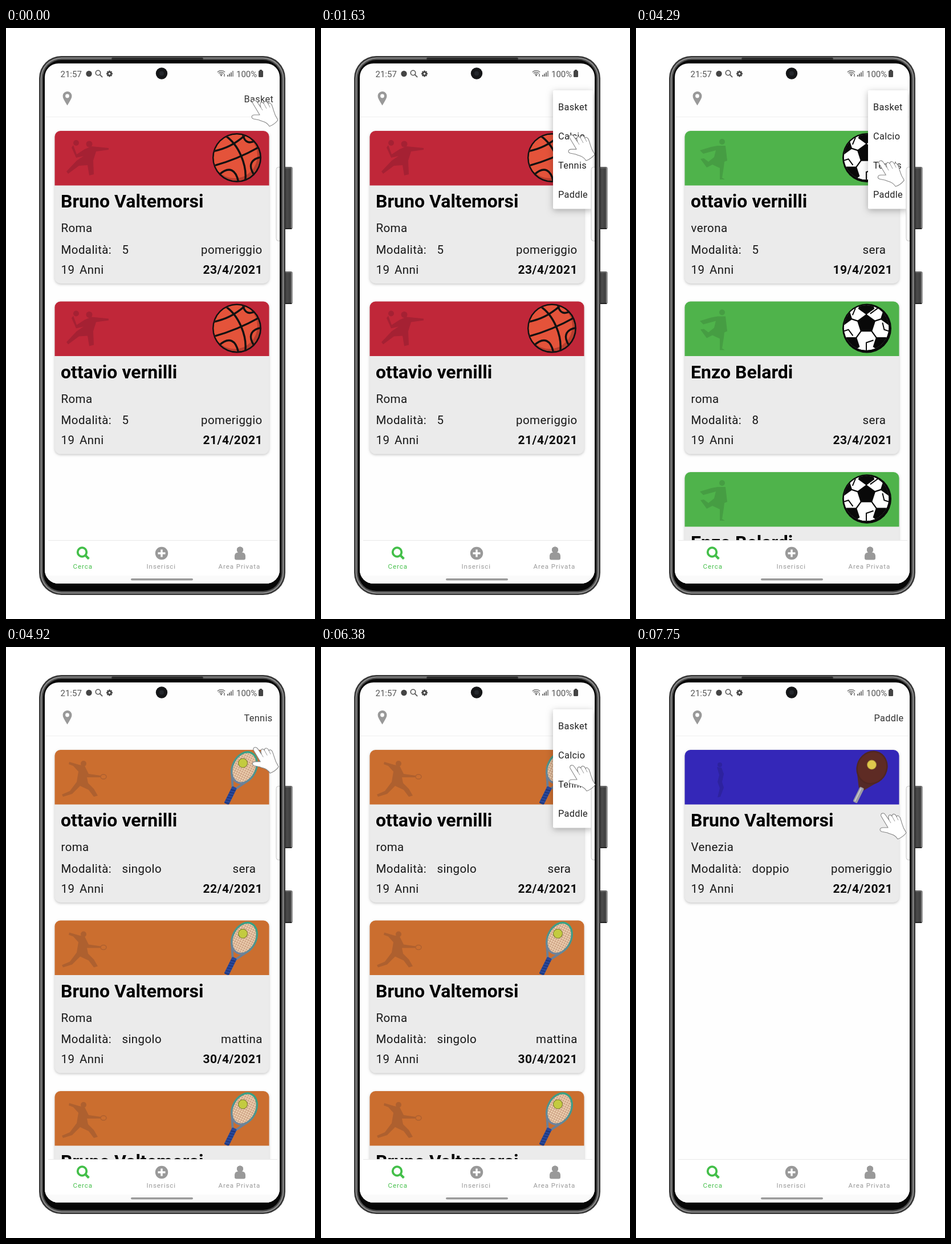
Recreate the animation shown at these times as an HTML page with a canvas. Size 542 by 1034 pixels, loop 7870 ms.

```html
<!DOCTYPE html>
<html lang="it">
<head>
<meta charset="utf-8">
<title>Cerca</title>
<style>
html, body { margin: 0; width: 100%; height: 100%; overflow: hidden; background: #fff; }
canvas { display: block; width: 542px; height: 1034px; }
</style>
</head>
<body>
<canvas id="stage" width="542" height="1034"></canvas>
<script>
const ctx = document.getElementById('stage').getContext('2d');
const LOOP = 7870;
const TAU = Math.PI * 2;
const BRUNO = 'Bruno Valtemorsi', OTTAVIO = 'ottavio vernilli', ENZO = 'Enzo Belardi';

// Card rows: name, city, mode, part of day, its x, date
const sports = {
  Basket: { color: '#c02739', shade: '#a52133', art: basketball, player: thrower, cards: [
    [BRUNO, 'Roma', '5', 'pomeriggio', 342, '23/4/2021'],
    [OTTAVIO, 'Roma', '5', 'pomeriggio', 342, '21/4/2021']] },
  Calcio: { color: '#4fb34b', shade: '#469d43', art: football, player: kicker, cards: [
    [OTTAVIO, 'verona', '5', 'sera', 397.5, '19/4/2021'],
    [ENZO, 'roma', '8', 'sera', 397.5, '23/4/2021'],
    [ENZO, 'roma', '8', 'sera', 397.5, '23/4/2021']] },
  Tennis: { color: '#cb6e2f', shade: '#ae602f', art: racket, player: tennisPlayer, cards: [
    [OTTAVIO, 'roma', 'singolo', 'sera', 397.5, '22/4/2021'],
    [BRUNO, 'Roma', 'singolo', 'mattina', 377, '30/4/2021'],
    [BRUNO, 'Roma', 'singolo', 'mattina', 377, '30/4/2021']] },
  Paddle: { color: '#3427b8', shade: '#2d229f', art: paddle, player: padelPlayer, cards: [
    [BRUNO, 'Venezia', 'doppio', 'pomeriggio', 342, '22/4/2021']] }
};

// Time, fingertip x, fingertip y
const handPath = [
  [0, 433, 128], [1080, 433, 129], [1560, 436, 188], [1980, 436, 189],
  [2600, 436, 138], [3450, 434, 131], [4180, 426, 233], [4480, 427, 234],
  [5300, 440, 131], [5580, 432, 129], [5960, 433, 131], [6380, 437, 208],
  [6960, 431, 290], [7750, 430, 292], [LOOP, 430, 292]
];
const menuTimes = [[1000, 1880], [3400, 4440], [5860, 7200]];

function sportAt(t) {
  return t < 1900 ? 'Basket' : t < 4460 ? 'Calcio' : t < 7220 ? 'Tennis' : 'Paddle';
}

function menuAlpha(t) {
  const clamp = v => Math.max(0, Math.min(1, v));
  return Math.max(...menuTimes.map(([a, b]) => Math.min(clamp((t - a) / 120), clamp((b + 80 - t) / 80))));
}

function handAt(t) {
  const i = Math.max(1, handPath.findIndex(k => k[0] >= t));
  const [t0, x0, y0] = handPath[i - 1], [t1, x1, y1] = handPath[i];
  const u = (t - t0) / (t1 - t0), e = u * u * (3 - 2 * u);
  return [x0 + (x1 - x0) * e, y0 + (y1 - y0) * e];
}

function box(x, y, w, h, r, color) {
  ctx.beginPath();
  ctx.roundRect(x, y, w, h, r);
  if (color) { ctx.fillStyle = color; ctx.fill(); }
}

function disc(x, y, r, color) {
  ctx.beginPath();
  ctx.arc(x, y, r, 0, TAU);
  ctx.fillStyle = color;
  ctx.fill();
}

function line(color, width, ...pts) {
  ctx.beginPath();
  for (let i = 0; i < pts.length; i += 2) ctx.lineTo(pts[i], pts[i + 1]);
  ctx.strokeStyle = color;
  ctx.lineWidth = width;
  ctx.stroke();
}

function poly(color, ...pts) {
  ctx.beginPath();
  for (let i = 0; i < pts.length; i += 2) ctx.lineTo(pts[i], pts[i + 1]);
  ctx.closePath();
  ctx.fillStyle = color;
  ctx.fill();
}

function text(str, x, y, size, color = '#181818', spacing = 0, weight = 400) {
  ctx.font = `${weight} ${size}px Roboto, sans-serif`;
  ctx.letterSpacing = spacing + 'px';
  ctx.fillStyle = color;
  ctx.fillText(str, x, y);
}

function shadowed(color, blur, dy, draw) {
  ctx.save();
  ctx.shadowColor = color;
  ctx.shadowBlur = blur;
  ctx.shadowOffsetY = dy;
  draw();
  ctx.restore();
}

function thrower(c) {
  disc(123, 201, 5, c);
  disc(146, 203, 5.5, c);
  poly(c, 118, 205, 124, 221, 138, 212, 150, 207, 180, 210, 180, 213, 158, 216, 153, 232, 154, 256,
    146, 258, 143, 240, 128, 241, 109, 255, 106, 251, 124, 232, 136, 224, 123, 227, 115, 209);
}

function kicker(c) {
  disc(151, 199, 5, c);
  poly(c, 143, 206, 157, 206, 160, 232, 155, 234, 154, 243, 151, 262, 156, 265, 147, 265, 147, 245,
    134, 239, 124, 244, 113, 229, 119, 228, 127, 234, 137, 226, 140, 214, 118, 220, 112, 214, 132, 208);
}

function tennisPlayer(c) {
  disc(136, 204, 5, c);
  poly(c, 128, 206, 138, 208, 145, 222, 166, 225, 165, 228, 142, 228, 144, 238, 154, 248, 161, 260,
    154, 262, 145, 250, 130, 243, 116, 257, 100, 262, 98, 258, 112, 252, 124, 236, 127, 218, 118, 208, 110, 205, 111, 201);
  ctx.beginPath();
  ctx.ellipse(171, 227, 5, 4, 0, 0, TAU);
  ctx.strokeStyle = c;
  ctx.lineWidth = 1.5;
  ctx.stroke();
}

function padelPlayer(c) {
  disc(147, 206, 4, c);
  poly(c, 142, 210, 150, 211, 154, 222, 151, 236, 154, 246, 148, 262, 143, 263, 147, 247, 143, 236, 146, 224);
}

function basketball() {
  ctx.save();
  ctx.translate(405, 227);
  disc(0, 0, 43, '#111');
  ctx.beginPath();
  ctx.arc(0, 0, 40.5, 0, TAU);
  ctx.clip();
  ctx.fillStyle = '#b93d2e';
  ctx.fill();
  disc(-4, -4, 40, '#e4533a');
  ctx.rotate(-0.38);
  ctx.strokeStyle = '#111';
  ctx.lineWidth = 3.4;
  ctx.beginPath();
  ctx.moveTo(-44, -2);
  ctx.quadraticCurveTo(0, 3, 44, -3);
  ctx.moveTo(-5, -44);
  ctx.bezierCurveTo(12, -20, 12, 20, -2, 44);
  ctx.moveTo(-36, -26);
  ctx.bezierCurveTo(-14, -22, 4, -22, 36, -34);
  ctx.moveTo(-40, 16);
  ctx.bezierCurveTo(-18, 8, -8, 18, -14, 44);
  ctx.moveTo(18, 44);
  ctx.bezierCurveTo(10, 16, 26, 10, 44, 16);
  ctx.moveTo(26, -40);
  ctx.bezierCurveTo(20, -18, 30, -14, 44, -16);
  ctx.stroke();
  ctx.restore();
}

function football() {
  const at = (r, a, x = 0, y = 0) => [x + r * Math.cos(a), y + r * Math.sin(a)];
  const pentagon = (x, y, r, turn) =>
    poly('#090909', ...[0, 1, 2, 3, 4].flatMap(i => at(r, turn + i * TAU / 5, x, y)));
  ctx.save();
  ctx.translate(405, 227);
  disc(0, 0, 43, '#090909');
  ctx.beginPath();
  ctx.arc(-1, -1, 39.5, 0, TAU);
  ctx.clip();
  ctx.fillStyle = '#fff';
  ctx.fill();
  ctx.translate(-1, -8);
  pentagon(0, 0, 17, -TAU / 4);
  for (let i = 0; i < 5; i++) {
    const a = -TAU / 4 + i * TAU / 5, far = [31, 41, 44, 44, 41][i];
    const p = at(far, a);
    line('#090909', 2.2, ...at(15, a), ...p);
    pentagon(...p, 15, a + Math.PI);
    const b = a + TAU / 10;
    line('#090909', 2, ...at(15, a + TAU / 4 + 1.1, ...p), ...at(33, b), ...at(60, b));
  }
  ctx.restore();
}

function racketHead(rx, ry, fill) {
  ctx.beginPath();
  ctx.ellipse(0, 0, rx, ry, 0, 0, TAU);
  ctx.fillStyle = fill;
  ctx.fill();
}

function racket() {
  ctx.save();
  ctx.translate(418, 211);
  ctx.rotate(0.46);
  line('#6d7f94', 4, -16, 17, -3, 40);
  line('#6d7f94', 4, 16, 17, 3, 40);
  box(-4.5, 38, 9, 33, 2, '#29489a');
  for (let y = 43; y < 70; y += 5) line('#182d6c', 1.2, -4, y + 2, 4, y);
  racketHead(20, 28, '#edd0b0');
  ctx.save();
  ctx.clip();
  for (let i = -28; i <= 28; i += 4) {
    line('#c6987c', 0.9, i, -30, i, 30);
    line('#c6987c', 0.9, -22, i, 22, i);
  }
  ctx.restore();
  const rim = ctx.createLinearGradient(0, -28, 0, 28);
  rim.addColorStop(0, '#38a184');
  rim.addColorStop(0.55, '#4f938f');
  rim.addColorStop(1, '#70829b');
  ctx.beginPath();
  ctx.ellipse(0, 0, 20.5, 28.5, 0, 0, TAU);
  ctx.strokeStyle = rim;
  ctx.lineWidth = 3.4;
  ctx.stroke();
  ctx.restore();
  disc(415.5, 203, 8.5, '#76732d');
  disc(415.5, 203, 7.5, '#c3cb3f');
}

function paddle() {
  ctx.save();
  ctx.translate(414, 211);
  ctx.rotate(0.46);
  poly('#542a27', -22, 16, 22, 16, 5, 42, -5, 42);
  box(-4, 39, 8, 29, 2, '#9b9ba3');
  line('#c9c9cd', 2, -1, 41, -1, 66);
  racketHead(27, 30, '#502622');
  racketHead(24.5, 27.5, '#5e2b24');
  ctx.restore();
  disc(413.5, 206, 8.5, '#a88c38');
  disc(413.5, 206, 7.5, '#dfc84c');
}

function card(sport, [name, city, mode, part, partX, date], dy) {
  ctx.save();
  ctx.translate(0, dy);
  shadowed('rgba(0,0,0,.22)', 4, 1.5, () => box(85.5, 180, 376, 267, 10, '#ebebeb'));
  box(85.5, 180, 376, 95.5, [10, 10, 0, 0], sport.color);
  ctx.save();
  ctx.clip();
  sport.player(sport.shade);
  sport.art();
  ctx.restore();
  text(name, 96, 314, 32, '#000', 0, 700);
  text(city, 96.5, 357, 20.5, '#181818', 0.4);
  text('Modalità:', 96.5, 394.5, 20.5, '#181818', 0.4);
  text(mode, 203.5, 394.5, 20.5, '#181818', 0.4);
  text(part, partX, 394.5, 20.5, '#181818', 0.4);
  text('19', 96.5, 429.5, 20.5, '#181818', 0.4);
  text('Anni', 129, 429.5, 20.5, '#181818', 0.4);
  text(date, 345.5, 429.5, 21, '#0a0a0a', 0.5, 700);
  ctx.restore();
}

function gear(x, y, r, color) {
  ctx.save();
  ctx.translate(x, y);
  for (let i = 0; i < 4; i++) {
    line(color, 2.6, -r, 0, r, 0);
    ctx.rotate(TAU / 8);
  }
  disc(0, 0, r * 0.75, color);
  disc(0, 0, r * 0.32, '#fff');
  ctx.restore();
}

function lens(x, y, r, width, tail, color) {
  ctx.beginPath();
  ctx.arc(x, y, r, 0, TAU);
  ctx.strokeStyle = color;
  ctx.lineWidth = width;
  ctx.stroke();
  const d = r * 0.75;
  line(color, width * 1.1, x + d, y + d, x + d + tail, y + d + tail);
}

function statusBar() {
  const c = '#555';
  text('21:57', 95.5, 85.5, 15, c, 0);
  disc(145.5, 80, 5.2, '#444');
  lens(161.5, 78.5, 4.2, 1.6, 4.5, c);
  gear(181.5, 80, 5.5, '#444');
  disc(273, 79.5, 10.2, '#151618');
  disc(273, 79.5, 4, '#24272c');
  ctx.lineWidth = 1.5;
  ctx.strokeStyle = '#777';
  for (const r of [3.5, 6.5, 9.5]) {
    ctx.beginPath();
    ctx.arc(377.5, 84, r, -2.35, -0.8);
    ctx.stroke();
  }
  disc(377.5, 83, 1.3, c);
  line(c, 1.2, 383, 80, 383, 85);
  for (let i = 0; i < 4; i++) line(i < 3 ? '#666' : '#888', 1.8, 389 + i * 3, 85, 389 + i * 3, 82 - i * 2.3);
  text('100%', 404, 85.5, 15, c, 0);
  box(443, 74.5, 8, 11.5, 1.5, '#444');
  box(445, 73, 4, 2, 0, '#444');
}

function header(label) {
  const c = '#999';
  ctx.beginPath();
  ctx.arc(107.5, 119, 8, Math.PI * 0.9, Math.PI * 0.1);
  ctx.quadraticCurveTo(114, 125, 107.5, 135.5);
  ctx.quadraticCurveTo(101, 125, 99.9, 121.5);
  ctx.fillStyle = c;
  ctx.fill();
  disc(107.5, 119, 3.4, '#fff');
  line('#f3f3f3', 1.5, 70, 155.5, 478, 155.5);
  text(label, 417.5, 130, 16.3, '#333', 0.35);
}

function navBar() {
  const grey = '#999', green = '#43bf49';
  box(68, 896, 412, 76, 0, '#fff');
  line('#e8e8e8', 1, 74, 896.5, 476, 896.5);
  lens(133.5, 917, 7.8, 3.8, 6, green);
  text('Cerca', 117.5, 946, 11.5, green, 0.95);
  disc(273, 919, 11.2, grey);
  line('#fff', 3.4, 266.5, 919, 279.5, 919);
  line('#fff', 3.4, 273, 912.5, 273, 925.5);
  text('Inserisci', 246.5, 946, 11.5, grey, 0.95);
  disc(410.5, 913, 5.6, grey);
  box(401, 917.5, 19, 13, [6, 6, 3, 3], grey);
  disc(410.5, 913, 5.6, grey);
  text('Area Privata', 372.5, 946, 11.5, grey, 0.95);
  box(68, 958, 412, 14, 0, '#fafafa');
  box(219, 963, 109, 3.6, 1.8, '#9a9a9a');
}

function menu(alpha) {
  if (!alpha) return;
  ctx.save();
  ctx.globalAlpha = alpha;
  shadowed('rgba(0,0,0,.28)', 12, 3, () => box(407, 109, 70, 207.5, 2, '#fff'));
  Object.keys(sports).forEach((name, i) => text(name, 416, 143.5 + i * 51.2, 16.3, '#222', 0.35));
  ctx.restore();
}

function edgeHandle() {
  box(474, 243.5, 12, 129, 4, '#fbfbfb');
  ctx.strokeStyle = '#c4c4c4';
  ctx.lineWidth = 1;
  ctx.stroke();
}

function sideButton(y, h) {
  const g = ctx.createLinearGradient(488, 0, 503, 0);
  g.addColorStop(0, '#222');
  g.addColorStop(0.3, '#4c4c4c');
  g.addColorStop(0.75, '#3e3e3e');
  g.addColorStop(0.88, '#999');
  g.addColorStop(1, '#333');
  box(487, y, 15.5, h, 2, g);
  line('#777', 1.2, 490, y + 1.5, 500, y + 1.5);
  line('#222', 2, 490, y + h - 1, 501, y + h - 1);
}

function phone() {
  sideButton(243, 109);
  sideButton(426, 57);
  box(58, 49, 432, 943, 39, '#363636');
  box(60.5, 51.5, 427, 938, 37, '#8e8e8e');
  box(62.5, 53.5, 423, 934, 35, '#4b4b4b');
  box(65, 56, 418, 929, 32, '#060606');
  box(185, 52, 161, 4, 2, '#2a2a2a');
}

function hand([x, y]) {
  ctx.save();
  ctx.translate(x, y);
  ctx.beginPath();
  ctx.moveTo(0, 4);
  ctx.bezierCurveTo(-2, -1, 4, -3, 7, 1);
  ctx.lineTo(14, 11);
  ctx.bezierCurveTo(11, 3, 15, -1, 19, 4);
  ctx.bezierCurveTo(19, -1, 25, -1, 27, 5);
  ctx.bezierCurveTo(28, 1, 33, 4, 34, 9);
  ctx.bezierCurveTo(37, 16, 36, 21, 44, 33);
  ctx.quadraticCurveTo(38, 41, 29, 44);
  ctx.bezierCurveTo(23, 35, 17, 36, 11, 33);
  ctx.lineTo(1, 31);
  ctx.bezierCurveTo(-4, 29, -2, 24, 3, 24);
  ctx.lineTo(12, 24);
  ctx.closePath();
  ctx.fillStyle = '#fff';
  ctx.fill();
  ctx.strokeStyle = '#858585';
  ctx.lineWidth = 1.1;
  ctx.lineJoin = 'round';
  ctx.stroke();
  line('#999', 1, 14, 11, 17, 16);
  line('#999', 1, 19, 4, 24, 13);
  line('#999', 1, 27, 5, 30, 11);
  ctx.restore();
}

function draw(t) {
  const label = sportAt(t), sport = sports[label];
  ctx.fillStyle = '#fff';
  ctx.fillRect(0, 0, 542, 1034);
  phone();
  ctx.save();
  box(68, 62, 412, 910, 24, '#fefefe');
  ctx.clip();
  sport.cards.forEach((row, i) => card(sport, row, i * 298.5));
  header(label);
  navBar();
  menu(menuAlpha(t));
  edgeHandle();
  statusBar();
  ctx.restore();
  hand(handAt(t));
}

const start = performance.now();
function tick() {
  draw((performance.now() - start) % LOOP);
  requestAnimationFrame(tick);
}
tick();
</script>
</body>
</html>
```
